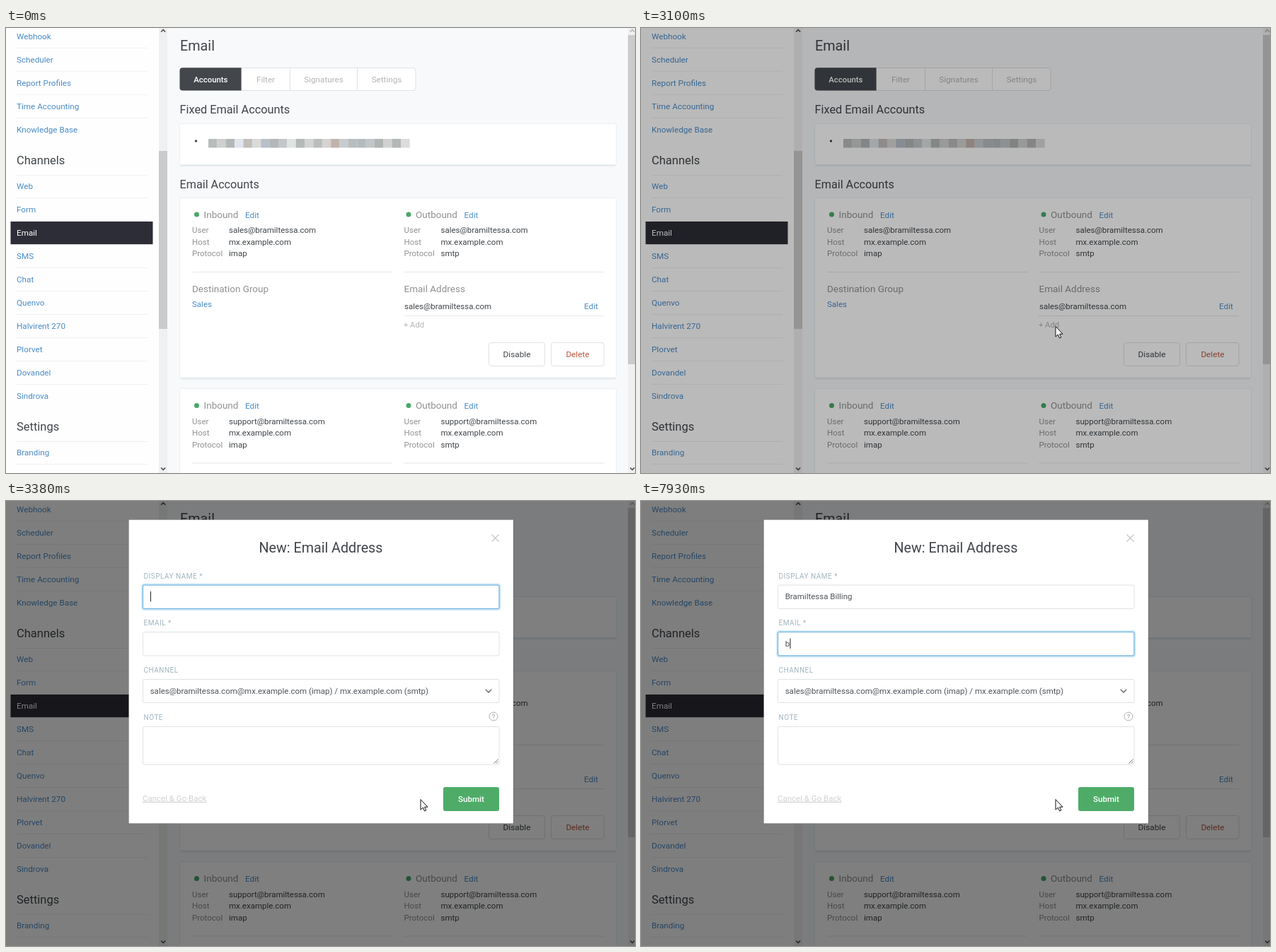
An HTML page that plays this animation: 889x630 px, repeating every 8 s.

```html
<!DOCTYPE html>
<html lang="en">
<head>
<meta charset="utf-8">
<title>Email channel settings</title>
<style>
  html, body { margin: 0; width: 100%; height: 100%; overflow: hidden; background: #fff; }
  svg { display: block; width: 889px; height: 630px; font-family: Roboto, "Open Sans", sans-serif; }
  text { white-space: pre; }
</style>
</head>
<body>
<svg id="stage" viewBox="0 0 889 630"></svg>
<script>
const LINK = '#4a8bc9', DARK = '#40454a', GREY = '#919191', PALE = '#b3b5b6';
const DOMAIN = 'bramiltessa.com', HOST = 'mx.example.com';
const NAME = 'Bramiltessa Billing';

const text = (s, x, y, fill = DARK, size = 11.5, extra = '') =>
  `<text x="${x}" y="${y}" fill="${fill}" font-size="${size}" ${extra}>${s}</text>`;
const centered = (s, x, y, fill, size, weight = 400) =>
  text(s, x, y, fill, size, `text-anchor="middle" font-weight="${weight}"`);
const rect = (x, y, w, h, fill, extra = '') =>
  `<rect x="${x}" y="${y}" width="${w}" height="${h}" fill="${fill}" ${extra}/>`;
const box = (x, y, w, h, r = 2, stroke = '#e0e1e1') =>
  rect(x, y, w, h, '#fff', `rx="${r}" stroke="${stroke}"`);
const rule = (x, y, w, color = '#e7e8e8') => rect(x, y, w, 1, color);
const line = (d, stroke, width) =>
  `<path d="${d}" fill="none" stroke="${stroke}" stroke-width="${width}"/>`;

function menu(items, y, endRule) {
  return items.map((item, i) => {
    const cy = y + i * 33, active = item === 'Email';
    const ruled = !active && (endRule || i < items.length - 1);
    return (active ? rect(6.5, cy - 16, 201, 32.2, '#2c2d36') : '') +
      (ruled ? rule(15, cy + 16, 185, '#eff0f0') : '') +
      text(item, 15, cy + 4.2, active ? '#fff' : LINK, 11.7);
  }).join('');
}

function sidebar() {
  return rect(0, 0, 216, 630, '#fefefe') +
    menu(['Webhook', 'Scheduler', 'Report Profiles', 'Time Accounting', 'Knowledge Base'], 11.7) +
    text('Channels', 15, 193, DARK, 16.5) + rule(15, 208, 185, '#eff0f0') +
    menu(['Web', 'Form', 'Email', 'SMS', 'Chat', 'Quenvo', 'Halvirent 270', 'Plorvet',
      'Dovandel', 'Sindrova'], 224) +
    text('Settings', 15, 570, DARK, 16.5) + rule(15, 585, 185, '#eff0f0') +
    menu(['Branding'], 601, true);
}

function scrollbar(x, top, bottom, upColor) {
  const c = x + 6.2;
  return rect(x, 0, 12.5, 630, '#f0f0f0') + rect(x, top, 12.5, bottom - top, '#cbcbcb') +
    line(`M${c - 3} 5.5l3-3 3 3`, upColor, 1.7) + line(`M${c - 3} 622.5l3 3 3-3`, '#505050', 1.7);
}

const card = (y, h) => rect(246, y + 2, 616, h, '#e6eaed', 'rx="2"') +
  box(245.5, y + .5, 617, h - 1, 2, '#e6f1f3');

function server(x, y, title, user, protocol) {
  const rows = [['User', `${user}@${DOMAIN}`], ['Host', HOST], ['Protocol', protocol]];
  return `<circle cx="${x + 6.5}" cy="${y}" r="3.5" fill="#48a868"/>` +
    text(title, x + 16.5, y + 4.8, GREY, 13.5) +
    text('Edit', x + (title === 'Inbound' ? 75 : 85), y + 4.6, LINK, 11.7) +
    rows.map(([label, value], i) =>
      text(label, x, y + 26.3 + i * 16.5, GREY) + text(value, x + 52, y + 26.3 + i * 16.5)).join('') +
    rule(x, y + 81, 283);
}

const account = (y, user) => server(263, y, 'Inbound', user, 'imap') +
  server(562.5, y, 'Outbound', user, 'smtp');

function main() {
  const mosaic = ('b8bdbb cfcfcf b2b8b8 dfe5ea c2bebb dadada b8c0c9 b3b7b9 c4c7c9 dde4e4 b3b9b7 d3d3d3 ' +
    'babdbd d6d3d1 c2b4ac c9cccf b7bdc1 b4bbbd c2c6c8 b0b4b3 d1d1d1 b3b7b6 dcdcdc').split(' ');
  return rect(228, 0, 651, 630, '#f8f9fb') + text('Email', 246, 32, DARK, 19.8) +
    box(246.5, 56.5, 332.5, 32, 4) +
    `<path d="M332.6 56.3v32.2H249.5a4 4 0 0 1-4-4V60.3a4 4 0 0 1 4-4z" fill="#43474c"/>` +
    rect(401, 57, 1, 31, '#e0e1e1') + rect(496, 57, 1, 31, '#e0e1e1') +
    centered('Accounts', 289.3, 76.7, '#fff', 11.4, 500) +
    [['Filter', 367], ['Signatures', 449], ['Settings', 538]]
      .map(([s, x]) => centered(s, x, 76.7, PALE, 11.7)).join('') +
    text('Fixed Email Accounts', 245.5, 121, DARK, 16.3) + card(135, 59) +
    `<circle cx="268.5" cy="160" r="1.7" fill="${DARK}"/>` +
    mosaic.map((c, i) => rect(286 + i * 12.37, 157, 12.5, 12.5, '#' + c)).join('') +
    text('Email Accounts', 245.5, 226.5, DARK, 16.2) +
    card(240, 255.5) + account(264, 'sales') +
    text('Destination Group', 263, 374, GREY, 13.5) + text('Sales', 263, 394.7, LINK) +
    text('Email Address', 562.5, 374, GREY, 13.5) +
    text(`sales@${DOMAIN}`, 563, 397.8) + text('Edit', 817, 397.8, LINK, 11.7) +
    rule(562, 407, 283) + text('+ Add', 562, 423.5, PALE, 11.2) +
    box(682.5, 445.5, 79, 33, 3) + centered('Disable', 722, 465.6, DARK, 11.8) +
    box(770.5, 445.5, 74.5, 33, 3) + centered('Delete', 808, 465.6, '#b9573f', 11.8) +
    card(510, 140) + account(534.5, 'support');
}

const label = (s, y) => text(s, 194.5, y, '#a1b5c0', 10, 'letter-spacing=".5"');
const field = (y, h) => box(193.5, y, 503.5, h);

function dialog() {
  return rect(173.5, 26.5, 543.5, 430, '#fff', 'stroke="#0002"') +
    centered('New: Email Address', 445, 72.5, DARK, 19.7) +
    line('M686.5 47.5l10 10m0-10l-10 10', '#c9cbcc', 1.5) +
    label('DISPLAY NAME *', 109.5) + field(119, 33.5) +
    label('EMAIL *', 176.3) + field(185.5, 33.5) +
    label('CHANNEL', 243) + field(252.5, 33) +
    text(`sales@${DOMAIN}@${HOST} (imap) / ${HOST} (smtp)`, 203.7, 272.7, '#50555a') +
    line('M677.8 266.8l4.2 4.2 4.2-4.2', '#75797c', 1.6) +
    label('NOTE', 310) + field(319.5, 53.5) +
    line('M689.5 371.5l6-6m-2.8 6l2.8-2.8', '#777', 1) +
    `<circle cx="689" cy="305" r="6" fill="none" stroke="#b0b0b0"/>` +
    centered('?', 689, 308.5, '#999', 9.5) +
    text('Cancel &amp; Go Back', 193, 424.8, '#cfd1d1', 11.5, 'text-decoration="underline"') +
    rect(618, 405, 79, 34, '#4eac68', 'rx="3"') + centered('Submit', 657.5, 425.8, '#fff', 11.6, 500) +
    `<g id="focus" fill="none"><rect x="192.5" y="118" width="505.5" height="35.5" rx="3" stroke="#d0e9f8" stroke-width="3"/>
      <rect x="193.5" y="119" width="503.5" height="33.5" rx="2" stroke="#5fabdd"/></g>` +
    text('', 203.7, 139.3, '#50555a', 11.5, 'id="name"') + text('', 203.7, 206, '#50555a', 11.5, 'id="email"') +
    rect(0, 128, 1, 14.5, '#222', 'id="caret"');
}

const stage = document.getElementById('stage');
stage.innerHTML = sidebar() + scrollbar(216, 174, 426, '#505050') + main() +
  scrollbar(879, 10, 476, '#b5b5b5') +
  rect(0, 0, 889, 630, '#000', 'id="dim"') + `<g id="dialog">${dialog()}</g>` +
  `<circle id="click" cx="585.5" cy="423" r="10" fill="#fbee00" fill-opacity=".66"/>
  <path id="arrow" d="M.5.5v14.6l3.3-3.1 2.3 5 2.2-1-2.2-4.8h4.5z" fill="#fff" stroke="#111"/>
  <path id="hand" transform="translate(581 422)" fill="#fff" stroke="#111" stroke-linejoin="round"
    d="M4.5 11V1.8q0-1.3 1.3-1.3t1.3 1.3V6.5q2.2-.8 2.6.6 2-.6 2.4.8 1.9-.4 1.9 1.4v4q0 2-1.2 3.2v2H5.5V17L.9 11.8q-.8-1.6.8-1.8 1 0 2.8 2z"/>`;

const $ = id => document.getElementById(id);
const [dim, modal, focus, name, email, caret, click, arrow, hand] =
  ['dim', 'dialog', 'focus', 'name', 'email', 'caret', 'click', 'arrow', 'hand'].map($);
const show = (el, on) => el.setAttribute('visibility', on ? 'visible' : 'hidden');
const move = (el, x, y) => el.setAttribute('transform', `translate(${x} ${y})`);

const KEYS = [5020, 5150, 5270, 5420, 5490, 5620, 5690, 5890, 6020, 6200, 6270,
  6680, 6810, 7010, 7140, 7270, 7470, 7540, 7610];
const TAB = 7810, FIRST_EMAIL_KEY = 7930;

function pointer(t) {
  if (t >= 1330) return [585.5, 422];
  const p = Math.min(11, Math.floor((t - 500) / 69)) / 11;
  const left = (1 - p) ** 2;
  return [583 + 116 * left, 424.5 + 195 * left];
}

function draw(t) {
  const pointing = t >= 1400 && t < 3100;
  show(arrow, t >= 500 && !pointing);
  show(hand, pointing);
  show(click, t >= 2900 && t < 3100);
  move(arrow, ...pointer(t));

  dim.setAttribute('opacity', t < 3100 ? 0 : t < 3170 ? .27 : .5);
  const p = Math.max(0, Math.min(3, Math.floor((t - 3170) / 70))) / 3;
  modal.setAttribute('opacity', Math.min(1, p * 1.5));
  move(modal, 0, -107 * (1 - p) ** 2);

  const inEmail = t >= TAB;
  name.textContent = NAME.slice(0, KEYS.filter(k => k <= t).length);
  email.textContent = t >= FIRST_EMAIL_KEY ? 'b' : '';
  const dy = inEmail ? 66.5 : 0;
  move(focus, 0, dy);
  move(caret, 204 + (inEmail ? email : name).getComputedTextLength(), dy);
}

const start = performance.now();
function tick() {
  draw((performance.now() - start) % 8000);
  requestAnimationFrame(tick);
}
tick();
</script>
</body>
</html>
```
